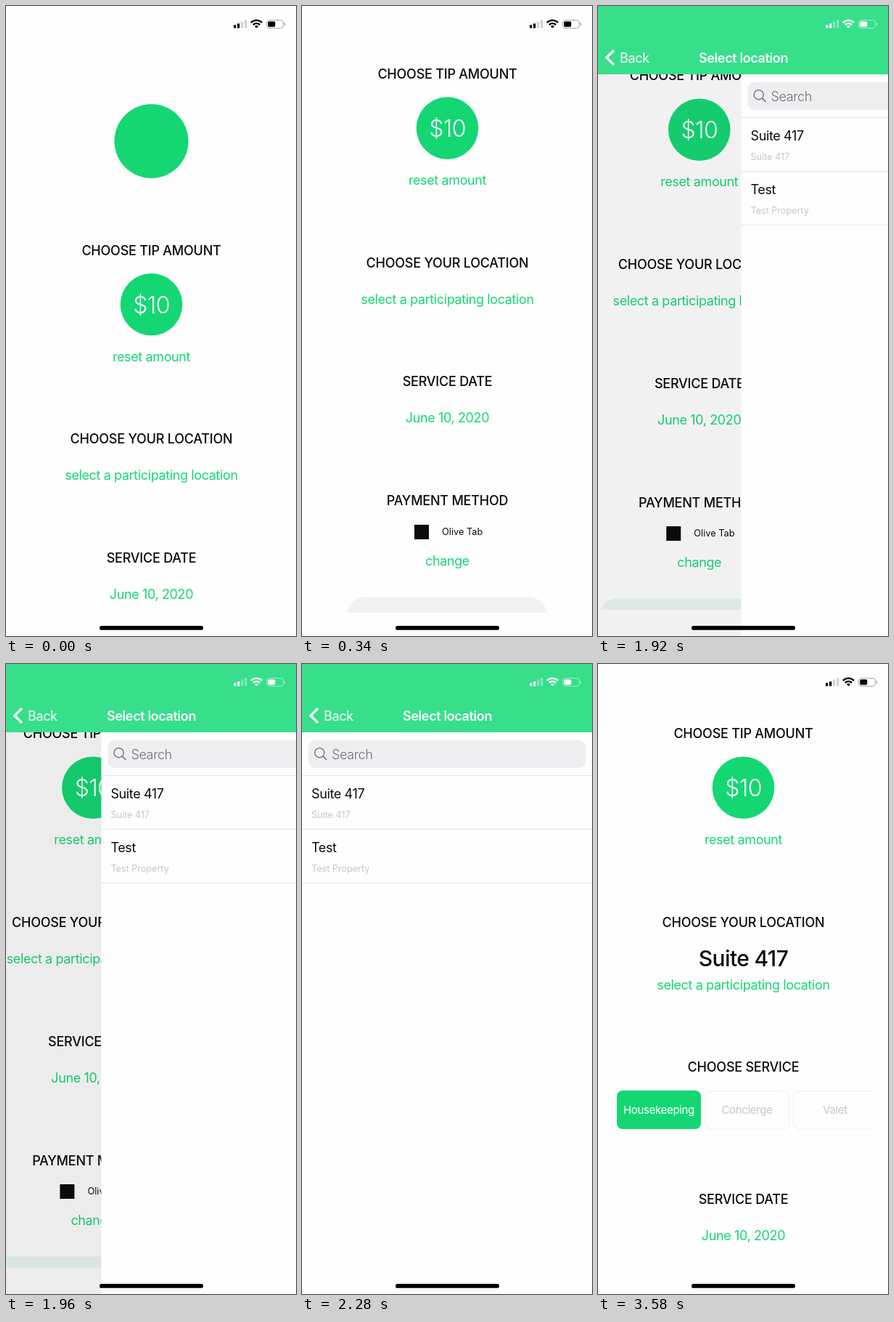
Write an HTML page with a canvas that moves like this. It is 400 px wide and 867 px high and loops after 3.6 s.

```html
<!DOCTYPE html>
<html lang="en">
<head>
<meta charset="utf-8">
<title>Tip app</title>
<style>
  html, body { margin: 0; width: 100%; height: 100%; overflow: hidden; background: #fefefe; }
  canvas { display: block; width: 400px; height: 867px; }
</style>
</head>
<body>
<canvas id="stage"></canvas>
<script>
const W = 400, H = 867, LOOP = 3600;
const GREEN = '#14d773', HEADER = '#37df8b', PAPER = '#fefefe', INK = '#0b0b0c';
const PLACE = 'Suite 417', WALLET = 'Olive Tab';

const canvas = document.getElementById('stage');
const ctx = canvas.getContext('2d');
const dpr = window.devicePixelRatio || 1;
canvas.width = W * dpr;
canvas.height = H * dpr;

function rect(x, y, w, h, color) {
  ctx.fillStyle = color;
  ctx.fillRect(x, y, w, h);
}

function roundPath(x, y, w, h, r) {
  ctx.beginPath();
  ctx.roundRect(x, y, w, h, r);
}

function fillRound(x, y, w, h, r, color) {
  roundPath(x, y, w, h, r);
  ctx.fillStyle = color;
  ctx.fill();
}

function strokeRound(x, y, w, h, r, color, width = 1) {
  roundPath(x, y, w, h, r);
  ctx.strokeStyle = color;
  ctx.lineWidth = width;
  ctx.stroke();
}

function disc(x, y, r, color) {
  ctx.beginPath();
  ctx.arc(x, y, r, 0, Math.PI * 2);
  ctx.fillStyle = color;
  ctx.fill();
}

function line(points, color, width) {
  ctx.beginPath();
  points.forEach(([x, y]) => ctx.lineTo(x, y));
  ctx.strokeStyle = color;
  ctx.lineWidth = width;
  ctx.stroke();
}

// y is the middle of the capital letters
function text(str, x, y, { size = 18, weight = 400, color = INK, align = 'center', track = -0.021 } = {}) {
  ctx.font = `${weight} ${size}px Inter, Roboto, sans-serif`;
  ctx.letterSpacing = `${track * size}px`;
  ctx.textAlign = align;
  ctx.fillStyle = color;
  ctx.fillText(str, x, y + size * 0.364);
}

const title = (str, y) => text(str, 200.5, y, { weight: 500, track: -0.013 });
const link = (str, y) => text(str, 200.5, y, { color: GREEN });

function clipped(x, y, w, h, draw) {
  ctx.save();
  ctx.beginPath();
  ctx.rect(x, y, w, h);
  ctx.clip();
  draw();
  ctx.restore();
}

function statusBar(color, faint, outline) {
  [[26, 4.5], [24, 6.5], [21.5, 9], [19, 11.5]].forEach(([y, h], i) =>
    fillRound(314 + i * 5, y, 3.3, h, 0.8, i < 2 ? color : faint));

  const from = -Math.PI * 0.75, to = -Math.PI * 0.25;
  ctx.beginPath();
  ctx.moveTo(345.5, 30.5);
  ctx.arc(345.5, 30.5, 3.6, from, to);
  ctx.fillStyle = color;
  ctx.fill();
  ctx.strokeStyle = color;
  ctx.lineWidth = 2.3;
  for (const r of [6.6, 10.8]) {
    ctx.beginPath();
    ctx.arc(345.5, 30.5, r, from, to);
    ctx.stroke();
  }

  strokeRound(359.5, 19.5, 23, 11, 3.5, outline);
  fillRound(361.3, 21.3, 10, 7.4, 1.6, color);
  fillRound(383.8, 23, 1.5, 4, 0.8, outline);
}

function amount(scroll) {
  title('CHOOSE TIP AMOUNT', 336 - scroll);
  disc(200.5, 410.7 - scroll, 42.8, GREEN);
  text('$10', 200.5, 411.2 - scroll, { size: 32, weight: 300, color: '#fff' });
  link('reset amount', 482.3 - scroll);
  title('CHOOSE YOUR LOCATION', 595.7 - scroll);
}

function serviceDate(y) {
  title('SERVICE DATE', y);
  link('June 10, 2020', y + 50);
}

function form(scroll, buttonColor) {
  disc(200.5, 186 - scroll, 51, GREEN);
  amount(scroll);
  link('select a participating location', 645.7 - scroll);
  serviceDate(759.5 - scroll);
  title('PAYMENT METHOD', 923.5 - scroll);
  rect(155, 956.5 - scroll, 20, 20, INK);
  text(WALLET, 193, 966.3 - scroll, { size: 12.8, align: 'left', track: 0 });
  link('change', 1006.2 - scroll);
  fillRound(62, 1056 - scroll, 276, 50, 25, buttonColor);
}

function filledForm() {
  amount(240.5);
  text(PLACE, 200.5, 405.5, { size: 30, weight: 500 });
  link('select a participating location', 441);
  title('CHOOSE SERVICE', 554.7);
  const label = { size: 14.9, track: -0.018 };
  fillRound(26, 587, 116, 53, 8, GREEN);
  text('Housekeeping', 84, 613.7, { ...label, color: '#fff' });
  clipped(140, 580, 240, 70, () => {
    ['Concierge', 'Valet'].forEach((name, i) => {
      const x = 148 + i * 121.5;
      strokeRound(x, 587.5, 115.5, 52.5, 8, '#ebf1ef');
      text(name, x + 57.5, 613.7, { ...label, color: '#c6c6cb' });
    });
  });
  serviceDate(736.7);
}

function row(name, note, y, picked) {
  if (picked) rect(0, y, W, 74, '#cccbd1');
  text(name, 13, y + 24.7, { align: 'left' });
  text(note, 13, y + 53.8, {
    size: 12.8, align: 'left', track: -0.008, color: picked ? '#c4c4c9' : '#c8c8cd'
  });
  rect(0, y + 73.5, W, 1, '#e5e5e8');
}

function listPage(x, picked) {
  ctx.save();
  ctx.translate(x, 0);
  rect(0, 94, W, H - 94, PAPER);
  fillRound(9, 105, 382, 38, 9, '#efedf0');
  ctx.beginPath();
  ctx.arc(24.2, 122.2, 6.6, 0, Math.PI * 2);
  ctx.strokeStyle = '#727278';
  ctx.lineWidth = 1.4;
  ctx.stroke();
  line([[28.9, 126.9], [34, 132]], '#727278', 1.6);
  text('Search', 41, 124, { weight: 300, color: '#6f6f75', align: 'left' });
  rect(0, 153, W, 1, '#e5e5e8');
  row(PLACE, PLACE, 153.5, picked);
  row('Test', 'Test Property', 227.5, false);
  ctx.restore();
}

function header() {
  rect(0, 0, W, 94, HEADER);
  line([[22, 61], [11.8, 71], [22, 81]], '#fff', 3.2);
  text('Back', 30, 71, { color: '#fff', align: 'left' });
  text('Select location', 200.5, 71, { weight: 600, color: '#fff' });
  statusBar('#fff', 'rgba(255,255,255,.35)', 'rgba(255,255,255,.5)');
}

function scrollAt(t) {
  if (t < 200) return 0;
  const u = Math.min(8, Math.floor((t - 200) / 20) + 1) / 8;
  return 242.6 * u * (1.6 - 0.6 * u);
}

// Critically damped slide; returns the share of the way still to go
function slideAt(t) {
  if (t >= 2280) return 0;
  const k = 0.0153 * (Math.floor((t - 1840) / 40) * 40 + 31);
  return (1 + k) * Math.exp(-k);
}

function draw(t) {
  ctx.setTransform(dpr, 0, 0, dpr, 0, 0);
  rect(0, 0, W, H, PAPER);

  if (t < 1840 || t >= 3580) {
    if (t < 1840) clipped(0, 0, W, 835, () => form(scrollAt(t), '#f0f3f2'));
    else filledForm();
    statusBar('#000', '#d2d2d4', '#a9a9ac');
  } else {
    const left = slideAt(t), done = 1 - left;
    if (left > 0) {
      clipped(0, 94, W, 737, () => {
        ctx.translate(-0.3 * W * done, 0);
        form(240.5, '#e8f7ef');
      });
      rect(0, 94, W, H - 94, `rgba(20,0,20,${0.07 * done / 0.67})`);
    }
    listPage(W * left, t >= 3480);
    header();
  }
  fillRound(129, 853, 143, 5.8, 2.9, '#000');
}

const start = performance.now();
function tick() {
  draw((performance.now() - start) % LOOP);
  requestAnimationFrame(tick);
}
tick();
</script>
</body>
</html>
```
